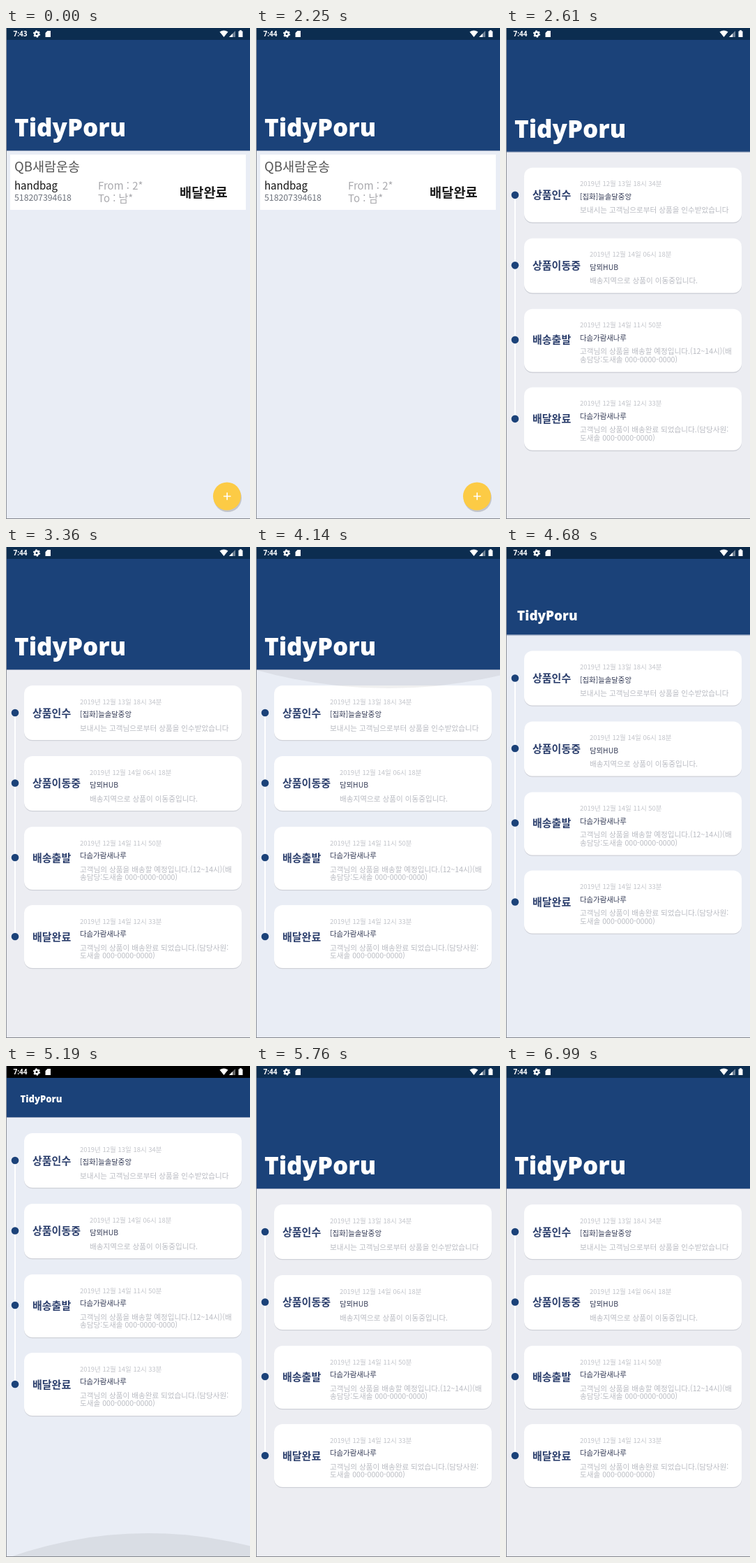
Write an HTML page that moves like this. It is 350x702 px and loops after 7020 ms.

```html
<!DOCTYPE html>
<html lang="ko">
<head>
<meta charset="utf-8">
<title>Parcel tracker</title>
<style>
  html, body { margin: 0; width: 100%; height: 100%; overflow: hidden; background: #e9edf5; }
  svg { display: block; width: 350px; height: 702px; }
  text { font-family: "Noto Sans CJK KR", "Noto Sans CJK", "Noto Sans", sans-serif; white-space: pre; }
  .title { font-family: "Open Sans", sans-serif; font-weight: 800; fill: #fff; }
  .clock { font: 700 10px "Open Sans", sans-serif; fill: #fff; }
  .label { font-size: 15px; font-weight: 700; fill: #2b3e6c; }
  .date { font-size: 9.5px; font-weight: 300; fill: #c2c4ca; }
  .place { font-size: 10.4px; font-weight: 400; fill: #333a55; }
  .note { font-size: 10.6px; font-weight: 300; fill: #b9bbc2; }
  .thin { font-weight: 300; }
</style>
</head>
<body>
<svg viewBox="0 0 350 702">
  <defs>
    <clipPath id="listArea"><rect id="clipRect" width="350" height="702"/></clipPath>
  </defs>

  <g id="home">
    <rect width="350" height="702" fill="#e9edf5"/>
    <rect width="350" height="175" fill="#1b4279"/>
    <rect y="175" width="350" height="1" fill="#8d9bb6"/>
    <text class="title" x="12" y="155" font-size="35">TidyPoru</text>
    <rect x="6" y="181" width="338" height="79" fill="#fff"/>
    <text class="thin" x="12" y="205" font-size="18.5" fill="#555">QB새람운송</text>
    <text x="12" y="231" font-size="15" font-weight="500" fill="#111">handbag</text>
    <text class="thin" x="12" y="247" font-size="12.3" fill="#6c717b">518207394618</text>
    <text class="thin" x="132" y="231" font-size="15" fill="#a9a9ad">From : 2*</text>
    <text class="thin" x="132" y="249" font-size="15" fill="#a9a9ad">To : 남*</text>
    <text x="249" y="241.5" font-size="18.7" font-weight="700" fill="#1c1c1c">배달완료</text>
    <circle cx="318" cy="672" r="20" fill="#c3c5cb"/>
    <circle cx="317" cy="669.5" r="20" fill="#fccb45"/>
    <path d="M312 669.5h10.5M317.2 664.3v10.5" stroke="#fff" stroke-width="1.6"/>
  </g>

  <g id="detail">
    <rect id="detailBg" width="350" height="760"/>
    <g id="timeline">
      <path d="M13 237V557" stroke="#fff" stroke-width="2"/>
    </g>
    <g clip-path="url(#listArea)">
      <circle id="topGlow" cx="190" r="700" fill="#3c3c3c"/>
      <circle id="bottomGlow" cx="204" r="592" fill="#3c3c3c"/>
    </g>
    <rect id="header" width="350" fill="#1b4279"/>
    <rect id="headerEdge" width="350" height="1" fill="#8d9bb6"/>
    <text id="title" class="title">TidyPoru</text>
  </g>

  <rect width="350" height="17" fill="#0c2d50"/>
  <rect id="statusDark" width="350" height="17" fill="#000"/>
  <text id="clock" class="clock" x="10.5" y="12"></text>
  <g fill="#fff">
    <circle cx="44" cy="8.5" r="2.7" fill="none" stroke="#fff" stroke-width="2.4"/>
    <circle cx="44" cy="8.5" r="4.4" fill="none" stroke="#fff" stroke-width="1.5" stroke-dasharray="2.3 2.308"/>
    <path d="M59.5 4H64V13H56.5V7Z"/>
    <path d="M306.5 5.5Q312.5 1.5 318.5 5.5L312.5 13Z"/>
    <path d="M320 13L329 4V13Z" opacity=".4"/>
    <path d="M320 13L325 8V13Z"/>
    <path d="M333.5 4.5H335V3.3H338V4.5H339.5V13H333.5Z"/>
  </g>
  <path d="M.5 0V702" stroke="#8f939b" stroke-width="1"/>
  <path d="M0 701.5H350" stroke="#85888f" stroke-width="1"/>
</svg>

<script>
const LOOP = 7020, OPEN = 175, SHUT = 73;
const $ = id => document.getElementById(id);
const svgNS = 'http://www.w3.org/2000/svg';

function add(name, attrs, text = '') {
  const el = document.createElementNS(svgNS, name);
  set(el, attrs);
  el.textContent = text;
  $('timeline').append(el);
}
function set(el, attrs) {
  for (const key in attrs) el.setAttribute(key, attrs[key]);
}

const steps = [
  { y: 198, h: 78, dot: 237, x: 106, label: '상품인수', date: '13일 18시 34분',
    place: '[집화]늘솔달중앙', notes: ['보내시는 고객님으로부터 상품을 인수받았습니다'] },
  { y: 299, h: 78, dot: 337.5, x: 120, label: '상품이동중', date: '14일 06시 18분',
    place: '담뫼HUB', notes: ['배송지역으로 상품이 이동중입니다.'] },
  { y: 400, h: 90, dot: 444, x: 106, label: '배송출발', date: '14일 11시 50분',
    place: '다솜가람새나루', notes: ['고객님의 상품을 배송할 예정입니다.(12~14시)(배', '송담당:도새솔 000-0000-0000)'] },
  { y: 512, h: 90, dot: 557, x: 106, label: '배달완료', date: '14일 12시 33분',
    place: '다솜가람새나루', notes: ['고객님의 상품이 배송완료 되었습니다.(담당사원:', '도새솔 000-0000-0000)'] }
];

for (const s of steps) {
  const card = { x: 26, width: 312, height: s.h, rx: 12 };
  add('rect', { ...card, y: s.y + 1.3, fill: '#cfd1d8' });
  add('rect', { ...card, y: s.y, fill: '#fff' });
  add('circle', { cx: 13, cy: s.dot, r: 5.3, fill: '#1b4279' });
  add('text', { class: 'label', x: 38, y: s.dot + 5.5 }, s.label);
  add('text', { class: 'date', x: s.x, y: s.y + 26.5 }, '2019년 12월 ' + s.date);
  add('text', { class: 'place', x: s.x, y: s.y + 45 }, s.place);
  s.notes.forEach((note, i) =>
    add('text', { class: 'note', x: s.x, y: s.y + 64.5 + i * 11.7 }, note));
}

const linear = p => p;
const smooth = p => p * p * (3 - 2 * p);
const mix = (a, b, p) => a + (b - a) * p;

// Value at time t along [time, value] pairs
function track(t, keys, ease = linear) {
  if (t <= keys[0][0]) return keys[0][1];
  for (let i = 1; i < keys.length; i++) {
    const [t0, a] = keys[i - 1], [t1, b] = keys[i];
    if (t < t1) return mix(a, b, ease((t - t0) / (t1 - t0)));
  }
  return keys[keys.length - 1][1];
}

const heightKeys = [[3390, OPEN], [3630, SHUT], [3690, SHUT], [3930, OPEN], [4170, OPEN],
  [4290, 141], [4650, 130], [4830, SHUT], [5350, SHUT], [5640, OPEN]];
const darkKeys = [[3500, 0], [3650, 1], [3720, 1], [3900, 0], [4650, 0], [4950, 1], [5370, 1], [5700, 0]];
const topKeys = [[3760, 0], [3900, 1], [4290, .6], [4500, 0], [5480, 0], [5580, 1], [5740, 0]];
const bottomKeys = [[3480, 0], [3600, 1], [3660, 1], [3900, 0], [4760, 0], [4950, 1], [5210, 1], [5340, 0]];

function render(t) {
  const enter = track(t, [[2380, 0], [2720, 1]]);
  const rise = 56 * (1 - enter) ** 3;
  const h = track(t, heightKeys, smooth);
  const fold = (OPEN - h) / (OPEN - SHUT);
  const top = track(t, topKeys), bottom = track(t, bottomKeys);
  const moving = t > 3400 && t < 5740;

  $('clock').textContent = t < 1380 ? '7:43' : '7:44';
  set($('detail'), {
    transform: `translate(0 ${rise})`,
    opacity: Math.min(1, enter * 1.6),
    visibility: enter > 0 ? 'visible' : 'hidden'
  });
  set($('detailBg'), { fill: moving ? '#e9edf5' : '#ecedf2' });
  set($('timeline'), { transform: `translate(0 ${h - OPEN})` });
  set($('header'), { height: h });
  set($('headerEdge'), { y: h });
  set($('clipRect'), { y: h });

  // Title shrinks with a decelerating curve while its position is linear
  set($('title'), {
    x: mix(12, 20.5, fold),
    y: mix(155, 52, fold),
    'font-size': mix(35, 13.1, 1 - (1 - fold) ** 2)
  });

  const topDepth = 27 * Math.min(1, top / .6);
  set($('topGlow'), { cy: h + topDepth - 700, opacity: top * .1 });
  set($('bottomGlow'), { cy: 702 - 34 * bottom + 592, opacity: bottom * .09 });
  set($('statusDark'), { opacity: track(t, darkKeys) });
}

const start = performance.now();
function tick() {
  render((performance.now() - start) % LOOP);
  requestAnimationFrame(tick);
}
tick();
</script>
</body>
</html>
```
